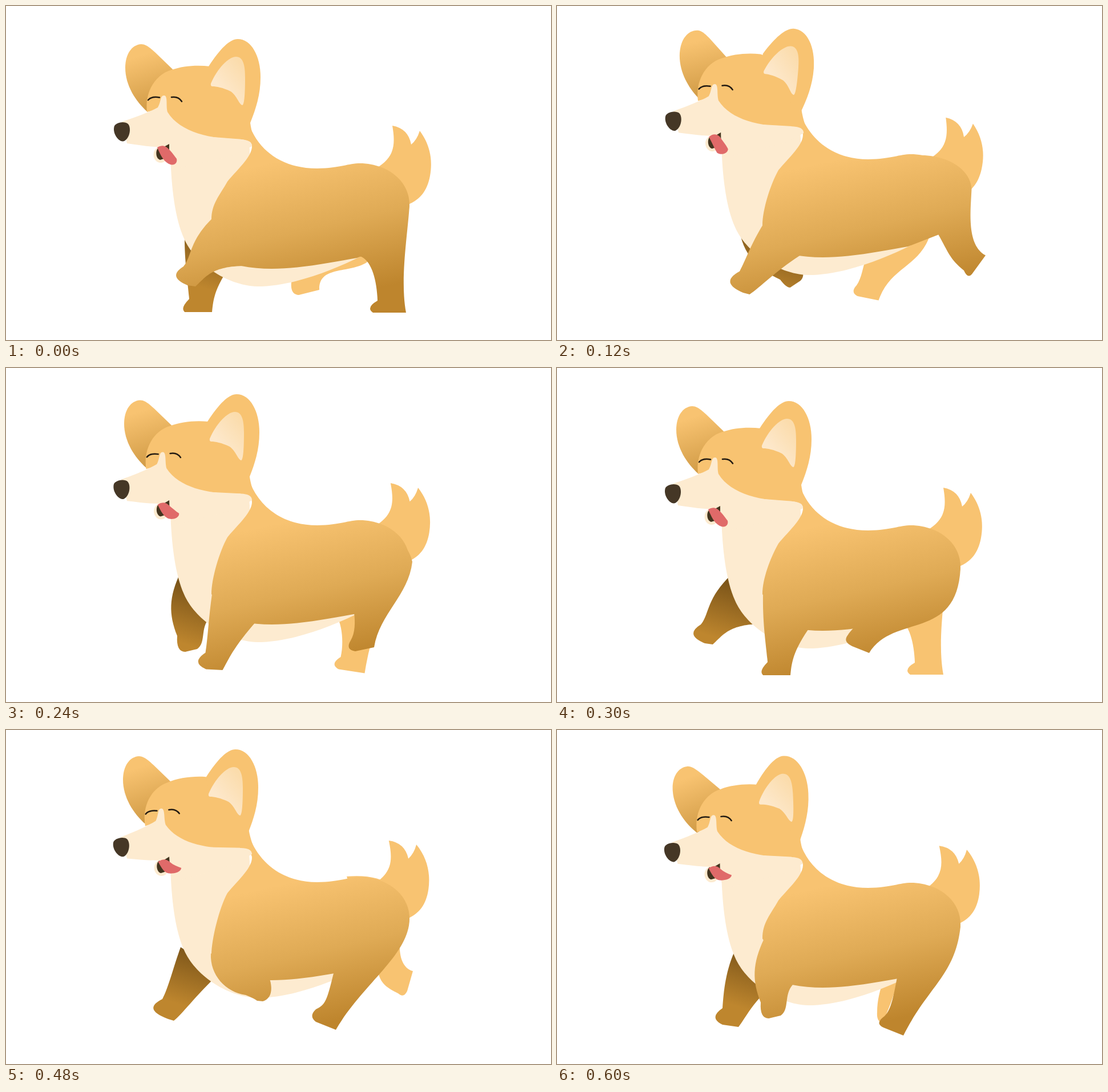
Recreate the animation shown at these times as an HTML page. Size 955 px wide and 586 px high, loop 660 ms.

```html
<!DOCTYPE html>
<html lang="en">
<head>
<meta charset="utf-8">
<title>Walking corgi</title>
<style>
html, body { margin: 0; width: 100%; height: 100%; overflow: hidden; background: #fff; }
svg { display: block; width: 100%; height: 100%; }
</style>
</head>
<body>
<svg viewBox="0 0 955 586">
  <defs>
    <linearGradient id="coat" gradientUnits="userSpaceOnUse" x1="505" y1="266" x2="560" y2="515">
      <stop offset="0" stop-color="#f8c371"/><stop offset=".5" stop-color="#dfaa55"/><stop offset="1" stop-color="#be852d"/>
    </linearGradient>
    <linearGradient id="shade" gradientUnits="userSpaceOnUse" x1="330" y1="385" x2="300" y2="480">
      <stop offset="0" stop-color="#7c5519"/><stop offset="1" stop-color="#be862e"/>
    </linearGradient>
    <linearGradient id="earBack" gradientUnits="userSpaceOnUse" x1="232" y1="88" x2="262" y2="182">
      <stop offset="0" stop-color="#f8c371"/><stop offset="1" stop-color="#d09a45"/>
    </linearGradient>
    <linearGradient id="earIn" gradientUnits="userSpaceOnUse" x1="372" y1="140" x2="415" y2="105">
      <stop offset="0" stop-color="#fde8cb"/><stop offset="1" stop-color="#fbdcac"/>
    </linearGradient>
  </defs>

  <path id="tail" fill="#f8c371" d="M650 284C680 265 683 245 677 210Q705 215 710 243Q720 235 725 219C743 243 748 270 743 298C738 325 725 340 705 348L660 340Z"/>
  <path id="rearFar" fill="#f8c371"/>
  <path id="frontFar" fill="url(#shade)"/>
  <path id="chest" fill="#fdebd0" d="M288 262C290 320 296 372 312 408C330 450 385 490 440 492C500 492 570 465 620 440L600 400L430 300L425 222L300 222Z"/>
  <path id="body" fill="url(#coat)"/>
  <path id="rearNear" fill="url(#coat)"/>
  <path id="frontNear" fill="url(#coat)"/>

  <path id="ear1" fill="url(#earBack)" d="M292 111L262 82C250 71 244 67 237 67C220 68 209 85 209 108C209 140 228 168 247 185L290 150Z"/>
  <g id="head">
    <path fill="#f8c371" d="M247 186C243 150 262 120 290 112C310 105 335 103 358 106L374 112L430 150L428 205C430 220 433 228 436 240L415 234L300 225L270 180Z"/>
    <path fill="#fdebd0" d="M203 203C225 196 250 187 266 178C272 168 270 157 277 157C284 157 280 175 283 186C305 222 360 234 412 234C424 235 431 238 431 246L400 262L300 285L288 275L285 247C262 249 240 245 212 241Z"/>
    <ellipse cx="271" cy="261" rx="12.5" ry="14" fill="#fdebd0"/>
    <path fill="#43351f" d="M268 248C261 252 262 268 270 270L277 268L270 250ZM286 242L277 247L286 256Z"/>
    <path id="tongue" fill="#e06a69"/>
    <path fill="#453726" d="M192 208C198 203 210 203 214 207C220 214 217 232 207 237C200 240 189 228 189 216Q189 210 192 208Z"/>
    <path fill="none" stroke="#231b12" stroke-width="2.5" stroke-linecap="round" d="M249 165Q255 158 269 160.500M290 160Q302 158 308 167.500"/>
  </g>
  <g id="ear2">
    <path fill="#f8c371" d="M355 106C375 75 392 58 406 58C430 58 446 88 446 125C446 155 438 180 428 205L360 140Z"/>
    <path fill="url(#earIn)" d="M359 136C370 110 390 89 403 89C416 89 419 105 419 125C419 150 418 174 414 174C408 172 405 158 394 150C380 143 368 141 362 141Q358 141 359 136Z"/>
  </g>
</svg>

<script>
const STEP = 60, COUNT = 11, NUM = /-?\d+(\.\d+)?/g;
const nums = s => s.match(NUM).map(Number);

// Halfway between two strings of the same structure.
function mix(a, b) {
  const other = nums(b);
  let i = 0;
  return a.replace(NUM, n => (+n + other[i++]) / 2);
}

function shift(path, dx, dy) {
  let i = 0;
  return path.replace(NUM, n => +n + (i++ % 2 ? dy : dx));
}

// Key poses in, one pose per step out.
function cycle(keys) {
  return Array.from({ length: COUNT }, (_, i) => keys[i] || mix(keys[i - 1], keys[i + 1]));
}

// Two bounces of the torso for each full stride of the legs.
const bounce = (a, b, c, d) => cycle({ 0: a, 1: b, 3: c, 5: a, 6: b, 8: c, 10: d });

const rearNear = cycle({
  0: "M640 300C680 300 707 325 707 350C704 400 690 480 701 538L643 538Q630 529 651 517C650 480 640 445 620 439Z",
  1: "M630 264C690 264 728 298 730 325C732 375 734 424 764 449L726 480Q717 484 714 463C700 440 690 425 669 403Z",
  3: "M622 260C685 254 723 280 723 318C717 350 702 415 738 426L728 461Q722 474 712 465C676 447 682 440 668 400Z",
  4: "M640 300C680 284 706 312 712 340C705 400 655 430 645 490L612 497Q594 494 604 478C612 465 612 445 610 430Z",
  5: "M640 300C680 300 707 325 707 352C700 480 590 430 547 500L517 488Q500 480 510 468C516 458 535 440 560 430Z",
  6: "M640 290C680 290 707 310 707 335C705 415 605 460 564 511L527 496Q517 488 528 479C547 465 550 455 557 434Z",
  8: "M640 290C680 290 707 308 707 332C706 395 625 445 578 526L543 512Q530 502 543 490C560 482 562 475 574 427Z",
  10: "M640 295C680 295 707 318 707 345C698 430 650 450 607 536L572 522Q556 515 574 502C586 490 590 465 596 434Z"
});

const rearFar = cycle({
  0: "M620 420C640 430 640 440 632 450C600 470 548 455 549 498L513 507Q498 506 500 485C500 470 540 470 580 430Z",
  1: "M640 400C645 405 648 410 645 416C620 468 556 455 547 500L506 499Q500 494 504 483C510 470 510 455 520 440Z",
  3: "M660 380C660 390 660 395 657 402C640 450 610 465 580 533L547 519Q527 510 546 497C558 485 562 460 565 435Z",
  5: shift(rearNear[0], -24, 0),
  6: shift(rearNear[1], -33, -5),
  8: shift(rearNear[3], -25, -3),
  9: shift(rearNear[4], -25, 0),
  10: "M600 420C605 430 600 440 595 445C590 470 580 490 572 512L566 512Q560 508 561 495C561 475 566 455 572 440Z"
});

const frontNear = cycle({
  0: "M364 370C320 412 326 440 311 457Q282 475 318 490L332 492C350 476 360 456 420 456Z",
  1: "M360 375C330 410 322 425 310 448Q274 469 312 488L325 491C350 475 375 455 420 439Z",
  3: "M362 392C350 425 340 465 330 483Q294 501 340 518L350 521C365 510 385 480 432 436Z",
  5: "M361 395C360 450 367 490 369 516Q353 532 361 539L409 539C411 520 412 500 440 459Z",
  6: "M360 388C362 440 395 470 420 487Q428 508 440 506L460 485C465 478 455 465 448 443Z",
  8: "M359 392C357 430 385 460 420 465Q435 471 440 475L450 476C470 470 465 445 462 437Z",
  10: "M363 366C342 410 342 440 357 478Q355 506 371 506L392 501C408 490 397 465 413 447Z"
});

const frontFar = cycle({
  0: shift(frontNear[5], -48, -2),
  1: shift(frontNear[6], -33, 0),
  3: "M312 388C318 430 345 455 395 473Q408 480 410 482L420 483C440 476 440 465 440 440Z",
  4: shift(frontNear[10], -57, -8),
  5: shift(frontNear[0], -59, -7),
  6: shift(frontNear[1], -59, -13),
  8: shift(frontNear[3], -56, -11),
  10: "M315 380C295 420 292 460 290 488Q265 505 290 517L318 521C330 505 340 485 360 465Z"
});

const hang = "M266 250Q278 242 287 252C292 257 299 260 306 263C305 271 290 273 282 271C274 268 270 258 266 250Z";
const tongue = bounce(
  "M265 248Q275 242 283 249C290 255 294 262 299 268C301 276 294 280 288 278C276 274 270 260 265 248Z",
  "M264 249Q272 240 281 247C284 256 291 268 290 280C289 290 279 291 275 284C274 270 270 262 264 249Z",
  hang, hang);

// Each: x, y, turn.
const head = bounce("0 0 0", "2.5 -22 1", "-1 -15 -3.3", "-1 -6 -1.4");
const ear1 = bounce("0 0 0", "5 -27 8.3", "-4 -21 0", "-1 -4 -4");
const ear2 = bounce("0 0 0", "5 -12 8.3", "-4 -24 0", "-3 -13 -3");
const tail = bounce("0 0 0", "0 -10 6.5", "-1 -17 -2.3", "-1 -8 -2.8");
// Belly lift and back lift.
const lift = bounce("0 0", "-18 -14", "-22 -18", "-9 -8");
const shoulder = [375, 375, 385, 394, 397, 397, 390, 392, 395, 380, 366];

function bodyPath(d, b, s) {
  return `M425 ${205 + d}C440 ${250 + d} 480 ${285 + b} 545 ${285 + b}
    C590 ${284 + b} 600 ${275 + b} 625 ${276 + b}C680 ${280 + b} 708 ${315 + b} 707 ${350 + b}
    C704 ${375 + b} 690 ${400 + d} 669 ${421 + d}L615 ${442 + d}
    C560 ${451 + d} 480 ${470 + d} 412 ${456 + d}L360 ${s}
    C360 ${s - 28} 374 ${333 + d} 388 ${308 + d}C405 ${287 + d} 431 ${265 + d} 431 ${246 + d}
    C431 ${238 + d} 424 ${235 + d} 412 ${234 + d}L400 ${200 + d}Z`;
}

const el = id => document.getElementById(id);
const setPath = (id, d) => el(id).setAttribute("d", d);
function place(id, pose, px, py) {
  const [x, y, r] = nums(pose);
  el(id).setAttribute("transform", `translate(${x} ${y}) rotate(${r} ${px} ${py})`);
}

const paths = { rearFar, frontFar, rearNear, frontNear, tongue };

function draw(i) {
  for (const id in paths) setPath(id, paths[id][i]);
  const [d, b] = nums(lift[i]);
  setPath("body", bodyPath(d, b, shoulder[i]));
  el("chest").setAttribute("transform", `translate(0 ${d})`);
  place("head", head[i], 203, 221);
  place("ear1", ear1[i], 246, 184);
  place("ear2", ear2[i], 414, 174);
  place("tail", tail[i], 700, 340);
}

let shown = -1;
function tick() {
  const i = Math.floor(performance.now() / STEP) % COUNT;
  if (i !== shown) draw(shown = i);
  requestAnimationFrame(tick);
}
tick();
</script>
</body>
</html>
```
